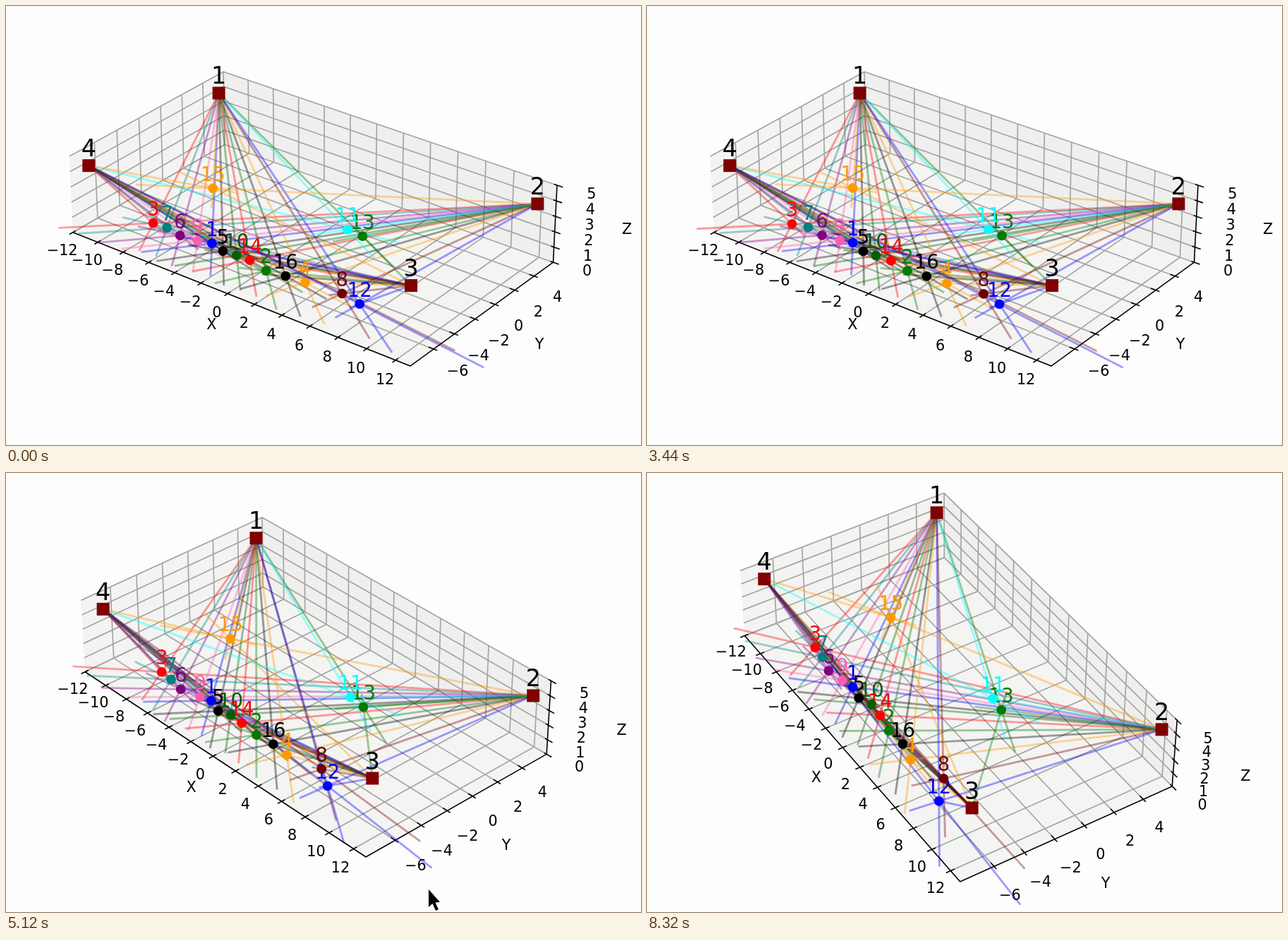
Write an HTML page with a canvas that moves like this. It is 900x622 px and loops after 8360 ms.

```html
<!DOCTYPE html>
<html lang="en">
<head>
<meta charset="utf-8">
<title>Ray triangulation in 3D</title>
<style>
  html, body { margin: 0; width: 900px; height: 622px; overflow: hidden; background: #fdfdfd; }
  canvas { display: block; }
</style>
</head>
<body>
<canvas id="stage" width="900" height="622"></canvas>
<script>
const ctx = document.getElementById('stage').getContext('2d');
const LOOP = 8360, STEP = 40, RAD = Math.PI / 180;
const FONT = '"DejaVu Sans", sans-serif';
const SCALE = 23.91, DIST = 159, CX = 431.8, CY = 287.9;

// Axis limits; ticks stand on whole numbers inside them.
const LO = [-12, -8.2, 0], HI = [13, 6, 5], EVERY = [2, 2, 1];
const TICKS = LO.map((lo, i) => {
  const list = [];
  for (let v = Math.ceil(lo / EVERY[i]) * EVERY[i]; v <= HI[i]; v += EVERY[i]) list.push(v);
  return list;
});
TICKS[1] = TICKS[1].filter(y => Math.abs(y) < 8 && y > LO[1] + 1 && y < HI[1]);

// The drag: time, azimuth, elevation
const CAMERA = [
  [4700, -52.59, 28.66], [5040, -42.4, 33.85],
  [5120, -42.4, 33.85], [5440, -32.05, 41.25]
];
// time, tip x, tip y
const POINTER = [
  [4440, 876, 500], [4600, 706, 549], [5040, 598, 587],
  [5120, 598, 587], [5360, 558, 606], [5480, 870, 612]
];

const SENSORS = [
  [-11.9, 5.4, 3.81], [11.8, 5.89, 3.47], [11.94, -6.8, 3.98], [-11.87, -6.71, 3.82]
].map(toBox);

// id, colour, mean place in the room
const TARGETS = [
  [3, '#ff0000', -7.99, -5.56, 0.71],
  [7, '#008080', -6.76, -5.68, 0.91],
  [6, '#800080', -5.3, -6.15, 1.09],
  [9, '#ff5cb0', -4.17, -5.77, 0.96],
  [1, '#0000ff', -3.39, -5.51, 0.93],
  [5, '#000000', -2.49, -5.66, 0.75],
  [10, '#006000', -1.9, -5.2, 0.52],
  [14, '#ff0000', -0.64, -5.34, 0.66],
  [2, '#007a00', 0.72, -5.54, 0.57],
  [16, '#000000', 2.33, -5.64, 0.79],
  [4, '#ff9900', 3.81, -5.85, 0.88],
  [8, '#700000', 5.92, -5.02, 0.57],
  [12, '#0000ff', 8.27, -6.75, 1.53],
  [13, '#007a00', 2.66, 1.06, 0.46],
  [11, '#00ffff', 1.65, 1.05, 0.6],
  [15, '#ff9900', -7.63, -0.38, 1.02]
].map(([id, color, ...home]) => ({ id, color, home }));

// sensor-target pairs without a ray
const BLIND = new Set(['3-3', '3-11', '4-13']);

function toBox([x, y, z]) {
  return [x - 0.5, 1.0237 * (y + 1.1), 1.034 * (z - 2.5)];
}

const dot = (a, b) => a[0] * b[0] + a[1] * b[1] + a[2] * b[2];
const mix = (a, b, u) => a.map((v, i) => v + (b[i] - v) * u);

function sample(keys, t) {
  const n = keys.findIndex(k => k[0] > t);
  if (n === 0) return keys[0].slice(1);
  if (n < 0) return keys[keys.length - 1].slice(1);
  const a = keys[n - 1], b = keys[n];
  return mix(a, b, (t - a[0]) / (b[0] - a[0])).slice(1);
}

function viewAt(t) {
  const [azim, elev] = sample(CAMERA, t);
  const sa = Math.sin(azim * RAD), ca = Math.cos(azim * RAD);
  const se = Math.sin(elev * RAD), ce = Math.cos(elev * RAD);
  return {
    right: [-sa, ca, 0],
    up: [-se * ca, -se * sa, ce],
    front: [ce * ca, ce * sa, se]
  };
}

function project(view, q) {
  const s = SCALE / (1 - dot(view.front, q) / DIST);
  return [CX + s * dot(view.right, q), CY - s * dot(view.up, q)];
}

function noise(n) {
  const v = Math.sin(n * 12.9898) * 43758.5453;
  return 2 * (v - Math.floor(v)) - 1;
}

// Measuring noise: a new value every 80 ms.
function place({ id, home }, t) {
  const seed = Math.floor(t / 80) * 53 + id * 3;
  return toBox(home.map((v, i) => v + [0.08, 0.08, 0.04][i] * noise(seed + i)));
}

// How far a ray runs, as a multiple of the way to its target.
function reach(sensor, q) {
  if (sensor === 2) return 1.19 - 0.0075 * q[0];
  return sensor === 4 && q[0] > 5 ? 1.42 : 1.2;
}

function stroke(points, color, width) {
  ctx.beginPath();
  points.forEach(p => ctx.lineTo(p[0], p[1]));
  ctx.strokeStyle = color;
  ctx.lineWidth = width;
  ctx.stroke();
}

function text(str, x, y, size, color = '#000') {
  ctx.font = `${size}px ${FONT}`;
  ctx.fillStyle = color;
  ctx.fillText(str, x, y);
}

function drawBox(view) {
  const at = (x, y, z) => project(view, toBox([x, y, z]));
  const [x0, y0, z0] = LO, [x1, y1, z1] = HI;
  const pane = (color, ...corners) => {
    ctx.beginPath();
    corners.forEach(c => ctx.lineTo(...at(...c)));
    ctx.fillStyle = color;
    ctx.fill();
  };
  pane('#f4f4f3', [x0, y0, z0], [x1, y0, z0], [x1, y1, z0], [x0, y1, z0]);
  pane('#f3f3f2', [x0, y0, z0], [x0, y1, z0], [x0, y1, z1], [x0, y0, z1]);
  pane('#efefee', [x0, y1, z0], [x1, y1, z0], [x1, y1, z1], [x0, y1, z1]);

  const grid = (...corners) => stroke(corners.map(c => at(...c)), '#a5a5a3', 1.7);
  TICKS[0].forEach(x => grid([x, y0, z0], [x, y1, z0], [x, y1, z1]));
  TICKS[1].forEach(y => grid([x1, y, z0], [x0, y, z0], [x0, y, z1]));
  TICKS[2].forEach(z => grid([x0, y0, z], [x0, y1, z], [x1, y1, z]));

  const line = (...corners) => stroke(corners.map(c => at(...c)), '#000', 1.6);
  line([x0, y0, z0], [x1, y0, z0], [x1, y1, z0], [x1, y1, z1]);

  const label = (str, ...pos) => {
    const [x, y] = at(...pos);
    text(String(str).replace('-', '\u2212'), x, y + 13.6, 20.8);
  };
  TICKS[0].forEach(x => {
    line([x, y0 - 0.3, z0], [x, y0 + 0.25, z0]);
    label(x, x, y0 - 0.97, z0 - 0.45);
  });
  TICKS[1].forEach(y => {
    line([x1 - 0.35, y, z0], [x1 + 0.25, y, z0]);
    label(y, x1 + 1.65, y, z0 - 0.5);
  });
  TICKS[2].forEach(z => {
    line([x1 - 0.2, y1, z], [x1 + 0.4, y1, z]);
    label(z, x1 + 1.84, y1 + 0.8, z);
  });
  label('X', 0.5, y0 - 2.05, z0 - 0.55);
  label('Y', x1 + 3.8, -1.1, z0 - 0.4);
  label('Z', x1 + 3.35, y1 + 2.5, 2.5);
}

function drawPointer(t) {
  if (t < POINTER[0][0] || t > 5480) return;
  const [x, y] = sample(POINTER, t);
  const shape = [[0, 0], [0, 25], [5.5, 20], [10, 30], [14, 28.5], [9.5, 18.5], [16, 18]];
  ctx.beginPath();
  shape.forEach(p => ctx.lineTo(x + 1 + p[0], y + 3 + p[1]));
  ctx.closePath();
  ctx.strokeStyle = '#fff';
  ctx.lineWidth = 4;
  ctx.stroke();
  ctx.fillStyle = '#000';
  ctx.fill();
}

function draw(t) {
  const view = viewAt(t);
  // The measurements rest for a moment in these two spans.
  const held = t > 5480 && t < 5680 ? 5480 : t > 8120 && t < 8240 ? 8120 : t;

  ctx.fillStyle = '#fdfdfd';
  ctx.fillRect(0, 0, 900, 622);
  ctx.textAlign = 'center';
  drawBox(view);

  const shown = TARGETS.map(g => {
    const q = place(g, held);
    return { ...g, q, pos: project(view, q) };
  });

  ctx.globalAlpha = 0.38;
  for (const { id, color, q } of shown) {
    SENSORS.forEach((s, i) => {
      if (BLIND.has(`${i + 1}-${id}`)) return;
      const end = mix(s, q, reach(i + 1, q));
      stroke([project(view, s), project(view, end)], color, 2.9);
    });
  }
  ctx.globalAlpha = 1;

  for (const { id, color, pos } of shown) text(id, pos[0], pos[1] - 10.5, 27.5, color);
  for (const { color, pos } of shown) {
    ctx.beginPath();
    ctx.arc(pos[0], pos[1], 6.9, 0, 7);
    ctx.fillStyle = color;
    ctx.fill();
  }

  SENSORS.forEach((s, i) => {
    const [x, y] = project(view, s);
    ctx.fillStyle = '#800000';
    ctx.fillRect(x - 9, y - 9, 18, 18);
    text(i + 1, x, y - 13, 33.3);
  });
  drawPointer(t);
}

const start = performance.now();
function tick() {
  const t = (performance.now() - start) % LOOP;
  draw(Math.floor(t / STEP) * STEP);
  requestAnimationFrame(tick);
}
tick();
</script>
</body>
</html>
```
